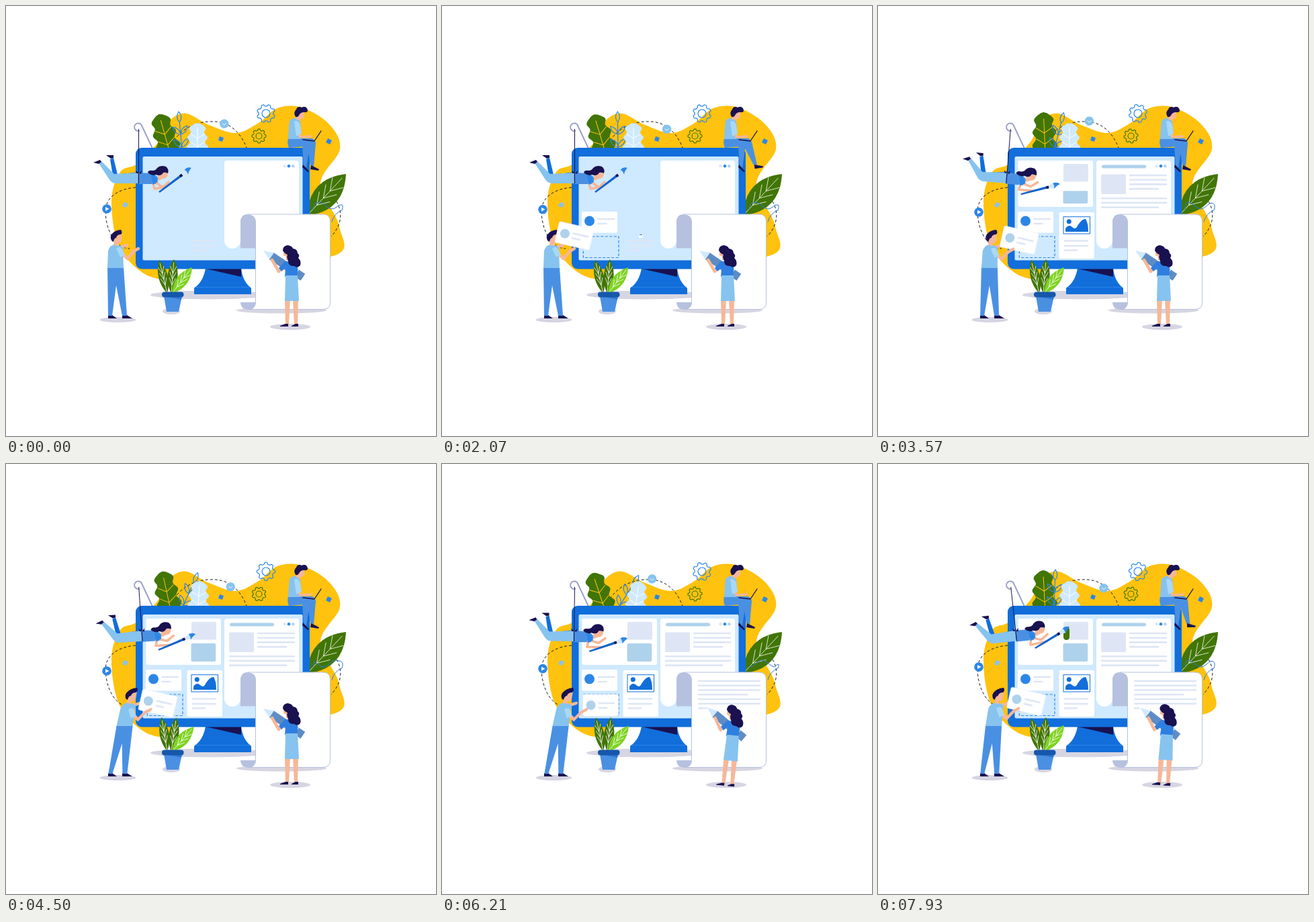
Animation of 640 by 640 pixels, one loop 8000 ms. Source, as an HTML page:

```html
<!DOCTYPE html>
<html lang="en">
<head>
<meta charset="utf-8">
<title>Building a page</title>
<style>
  html, body { margin: 0; width: 100%; height: 100%; overflow: hidden; background: #fff; }
  svg { display: block; width: 100%; height: 100%; }
  .line { fill: none; stroke-linecap: round; stroke-linejoin: round; }
  .dash { fill: none; stroke: #1d1d2b; stroke-dasharray: 4 3; }
  .white { fill: #fff; } .navy { fill: #191150; } .skin { fill: #f6b798; }
  .royal { fill: #116edb; } .blue { fill: #4a90e2; } .sky { fill: #86c3ef; }
  .ice { fill: #cfe9ff; } .soft { fill: #afd2ec; } .gray { fill: #dee6f5; }
  .bright { fill: #2c86e8; } .shade { fill: #d6d5e2; } .leaf { fill: #417505; }
  .lime { fill: #7ed321; } .sleeve { fill: #a9d8f7; } .roll { fill: #b5c1de; }
  .arm { stroke: #f6b798; stroke-width: 4.5; } .thin { stroke-width: 3.5; }
  .text { stroke: #dee6f5; stroke-width: 2.6; }
  .outline { stroke: #2c86e8; stroke-width: 1.2; }
</style>
</head>
<body>
<svg viewBox="0 0 640 640" xmlns="http://www.w3.org/2000/svg">
  <path id="blob" fill="#ffc20e"/>
  <ellipse class="shade" cx="303" cy="430" rx="88" ry="6.5"/>
  <path class="dash" d="M246 206C261 182 282 172 306 172C331 171 349 187 358 211"/>
  <path class="dash" d="M193 270C168 272 148 284 148 306C149 338 165 361 184 361"/>
  <path class="dash" d="M492 291C502 308 499 327 484 343"/>

  <g id="fan"></g>
  <g id="sprig"></g>
  <g id="pale"></g>
  <g id="bigLeaf"></g>
  <path id="squiggle" class="line" stroke="#2c7be0"/>

  <g class="line" stroke-width="1.2">
    <g transform="translate(387 160)" stroke="#2c86e8"><path id="bigGear"/><circle r="6"/></g>
    <g transform="translate(376.5 193.5)" stroke="#417505"><path id="smallGear"/><circle r="4.5"/></g>
  </g>
  <path class="bright" d="M318 194l6 2l-2 6l-6-2zM479 197l6 3l-3 6l-6-3z"/>
  <path class="sky" d="M176 292l6 2l-3 6l-6-2z"/>
  <g id="check"><circle r="6.7" class="sky"/><path class="line" stroke="#fff" d="M-2.5-.5L0 2L2.5-.5"/></g>
  <g id="play"><circle r="6.8" class="bright"/><path class="white" d="M-2-3L3.5 0L-2 3Z"/></g>
  <path class="line" stroke="#9a9fc8" stroke-width="1.9" d="M198 186A5.8 5.8 0 1 1 202.5 179L218 212"/>

  <!-- Monitor -->
  <path class="royal" d="M297 390H350Q352 410 365 420V429H280V420Q294 410 297 390Z"/>
  <path class="navy" d="M297 391H350V403Z"/>
  <path stroke="#3b8cec" stroke-width=".7" d="M281 418.5H364"/>
  <rect class="royal" x="193" y="211" width="259" height="180.5" rx="9"/>
  <rect class="ice" x="203.5" y="224" width="238" height="154.5" rx="2"/>
  <path class="white" d="M329 230H432Q436 230 436 234V310H360Q349 311 349 322V349A12 12 0 0 1 325 349V234Q325 230 329 230Z"/>
  <circle class="gray" cx="414.5" cy="238.3" r="2.3"/><circle class="bright" cx="421" cy="238.3" r="2.3"/><circle class="soft" cx="427.3" cy="238.3" r="2.3"/>

  <g id="hero">
    <rect class="white" x="208.5" y="230" width="111.5" height="69" rx="3"/>
    <rect id="heroTop" class="gray" x="276" y="235" width="37" height="26.5" rx="2"/>
    <rect id="heroLow" class="soft" x="275.5" y="267" width="36.7" height="27" rx="2"/>
  </g>
  <path id="heading" class="line" stroke="#afd2ec" stroke-width="5"/>
  <g id="article"></g>
  <rect id="thumb" class="gray" x="332" y="250.5" width="37" height="29.5" rx="2"/>
  <g id="profile">
    <rect class="white" x="208" y="306" width="53" height="31.5" rx="2"/>
    <circle class="bright" cx="219.5" cy="320" r="7.5"/>
    <path class="line text" d="M232.5 317H256M232.5 324H244.5"/>
  </g>
  <rect id="slot" class="outline" x="210.3" y="343" width="52.7" height="31.5" fill="none" stroke-dasharray="4 2.5"/>
  <g id="photo">
    <rect class="white" x="269.5" y="307" width="52.5" height="69" rx="2"/>
    <rect x="276" y="313.7" width="39.5" height="25.3" fill="none" stroke="#116edb"/>
    <circle class="royal" cx="284.3" cy="320.7" r="3.5"/>
    <path class="royal" d="M279 336V331Q284 324 289 329T297 327Q304 316 309 317Q313 323 313 336Z"/>
  </g>
  <path class="line text" d="M278 349.5H312M278 357H312M278 363.5H296"/>

  <!-- Paper -->
  <ellipse class="shade" cx="410" cy="453" rx="67" ry="4.5"/>
  <path fill="#fff" stroke="#b5c1de" d="M360 310H472Q482.5 310 482.5 321V441Q482.5 451.5 472 451.5H360Q371.5 451 371.5 441V322Z"/>
  <path class="roll" d="M349 360.5V322Q349 310 360 310Q372 311 372 322V360.5ZM349 441H371.5Q371 452 360 452Q349 451 349 441Z"/>
  <g id="notes" class="gray"></g>

  <!-- Potted plant -->
  <ellipse class="shade" cx="246" cy="454.5" rx="13" ry="4.5"/>
  <g id="plant"></g>
  <path class="blue" d="M235 432H262L257 455H239Z"/>
  <path fill="#2f78d4" d="M235 432H262L261 437Z"/>
  <rect x="232" y="425.5" width="32.5" height="8" rx="4" fill="#1657ab"/>

  <!-- Sitting man -->
  <path class="blue" d="M441 207H452L447 241L443 239Z"/>
  <path class="navy" d="M442 236L451 246L449 247L441 240Z"/>
  <g id="shin">
    <path class="blue" d="M447 200L461 204L458 239L453 237Z"/>
    <path class="navy" d="M454 237L466 243L465 245L453 243Z"/>
  </g>
  <path class="blue" d="M420 197H456Q463 201 460 208L421 211Q418 204 420 197Z"/>
  <path class="sky" d="M422 171Q429 164 437 168Q441 182 438 198H420Q421 180 422 171Z"/>
  <path class="skin" d="M433 157H444V164Q444 168 439 168L438 171L431 168Z"/>
  <path class="navy" d="M431 165Q427 158 432 154Q434 148 440 151Q447 148 449 155Q449 159 444 158Q438 158 436 163Q434 166 431 165Z"/>
  <path class="line arm thin" d="M434 183L438 195L454 194"/>
  <path class="sleeve" d="M429 172Q435 169 438 177L440 190L432 194Z"/>
  <path class="line" stroke="#191150" stroke-width="1.3" d="M442 199L459 201L469 186"/>

  <!-- Hanging woman -->
  <g id="swing">
    <path stroke="#191150" d="M197.5 183V249"/>
    <path class="royal" d="M155 228L160 226L166 251L198 247V256L160 259Z"/>
    <path class="sky" d="M200 248L197 264H164Q157 264 153 257L138 234L142 231L161 250Z"/>
    <path class="navy" d="M130 233L140 229L142 232L138 235ZM149 222H160V226L156 227Z"/>
    <path class="blue" d="M197 248L216 249Q224 251 227 257L223 265H197Z"/>
    <path class="navy" d="M196.800 245H198V264H196.800ZM198 249L193 245L194 249ZM198 249L202 245L201 250Z"/>
    <path class="skin" d="M226 250L239 247L241 250Q240 257 234 257L226 260Z"/>
    <path class="navy" d="M211 248Q212 244 218 245Q223 245 225 241Q230 236 238 239Q243 243 241 249Q237 247 234 248Q231 254 223 251Q218 254 211 248Z"/>
    <path id="reachFar" class="line arm thin"/>
    <path id="reachNear" class="line arm thin"/>
    <path class="bright" d="M216 251Q223 252 226 262L218 266Z"/>
  </g>
  <path id="paint" class="line" stroke="#417505" stroke-width="9"/>
  <g id="brush">
    <path d="M0-1.2L42-1.8V1.8L0 1.2Z" fill="#1263cd"/>
    <path class="navy" d="M39-1.9H43V1.9H39Z"/>
    <path class="ice" d="M43-2.2L51-4V4L43 2.2Z"/>
    <path class="bright" d="M50-4Q57-5 60 0Q54 1 50 5Q52 0 50-4Z"/>
  </g>

  <!-- Standing man with card -->
  <ellipse class="shade" cx="166.5" cy="467" rx="27" ry="4"/>
  <path class="navy" d="M152 460L158 460L165 465H152ZM173 460H180L188 465H173Z"/>
  <g id="man">
    <path class="line arm" d="M167 360L180 356"/>
    <path class="blue" d="M151 389H175L180 461H173L164 416L158 461H152Z"/>
    <path class="sky" d="M152 364Q155 354 165 355L174 359L175 390H151Z"/>
    <path class="skin" d="M161 342L172 338V349Q171 354 166 353L167 357L160 356Z"/>
    <path class="navy" d="M158 350Q154 345 157 340Q161 334 171 333Q174 337 171 340Q165 340 164 345Q161 345 160 351Z"/>
  </g>
  <g id="card">
    <rect x="-26.5" y="-16" width="53" height="32" rx="2.5" fill="#fff" stroke="#e9eef8" stroke-width=".5"/>
    <circle class="soft" cx="-14.5" r="7"/>
    <path class="line text" d="M-2-3H20M-2 4H9"/>
  </g>
  <g id="manArm">
    <path class="line arm" d="M171 367L181 376L190 365L197 361"/>
    <path class="sleeve" d="M164 361Q169 356 173 362L177 370L170 374Z"/>
  </g>

  <!-- Standing woman with pencil -->
  <ellipse class="shade" cx="423" cy="477.5" rx="30" ry="4.5"/>
  <g id="writer">
    <g transform="translate(383 364) rotate(34)">
      <path fill="#5e8cc5" d="M14-6H71V6H14Z"/>
      <path class="ice" d="M0 0L15-6V6ZM56-6H60V6H56Z"/>
    </g>
    <path class="skin" d="M415 437H423L421 474H416ZM427 437H435L434 474H429Z"/>
    <path class="navy" d="M408 476L416 473H420V477H408ZM425 476L431 473H435V477H425Z"/>
    <path class="line arm" d="M413 387L406 395L396 378"/>
    <path class="skin" d="M413 365L422 363L423 380L417 378V373L413 371Z"/>
    <path fill="#2f7fe0" d="M406 390L415 380H432Q436 390 433 403H415L416 390L410 395Z"/>
    <path class="sky" d="M416 401H434L436 439H415Z"/>
    <path class="navy" d="M412 364Q412 357 419 356Q426 357 427 361Q434 362 434 368Q438 371 435 375Q440 380 438 386Q434 391 429 387Q420 388 420 379Q417 374 419 370Q415 369 412 364Z"/>
  </g>
</svg>
<script>
const LOOP = 8000;
const TAU = Math.PI * 2;
const $ = id => document.getElementById(id);
const set = (id, name, value) => $(id).setAttribute(name, value);
const place = (id, value) => set(id, 'transform', value);
const clamp = (v, lo = 0, hi = 1) => Math.max(lo, Math.min(hi, v));
const mix = (a, b, k) => a + (b - a) * k;

// Motion rules: eased step, step up and back down, cosine wave
function ramp(t, from, to) {
  const k = clamp((t - from) / (to - from));
  return k * k * (3 - 2 * k);
}
const pulse = (t, rise, top, fall, end) => ramp(t, rise, top) - ramp(t, fall, end);
const wave = (t, peak, period) => Math.cos(TAU * (t - peak) / period);
const grow = (id, x, y, k) => place(id, `translate(${x} ${y}) scale(${k}) translate(${-x} ${-y})`);
const sway = (id, x, y, angle) => place(id, `translate(${x} ${y}) rotate(${angle})`);

function addPath(parent, className, d = '') {
  const el = $(parent).appendChild(document.createElementNS('http://www.w3.org/2000/svg', 'path'));
  el.setAttribute('class', className);
  el.setAttribute('d', d);
  return el;
}

const polygon = points => 'M' + points.map(p => p.map(v => v.toFixed(2)).join(' ')).join('L') + 'Z';

// Closed smooth curve through points
function smooth(points) {
  const at = i => points[(i + points.length) % points.length];
  const handle = (i, side) => [0, 1].map(c => at(i)[c] + side * (at(i + 1)[c] - at(i - 1)[c]) / 6);
  return `M${at(0)}` + points.map((_, i) => `C${handle(i, 1)} ${handle(i + 1, -1)} ${at(i + 1)}`).join('') + 'Z';
}

function gear(radius) {
  return polygon(Array.from({ length: 128 }, (_, i) => {
    const a = i / 128 * TAU;
    const r = radius * (0.89 + 0.1 * Math.tanh(2.5 * Math.cos(8 * a)));
    return [r * Math.cos(a), r * Math.sin(a)];
  }));
}

// Upright leaf with wavy lobes, growing from the origin
function lobedLeaf(parent, className, length, width, vein) {
  const side = sign => Array.from({ length: 61 }, (_, i) => {
    const s = i / 60;
    const lobes = 0.87 + 0.15 * wave(s, 0.88, 0.24);
    return [sign * width * (1 - 0.2 * s) * Math.sqrt(1 - s ** 10) * lobes, -s * length];
  });
  addPath(parent, className, polygon([...side(-1), ...side(1).reverse()]));
  let veins = `M0 0V${-0.88 * length}`;
  for (const s of [0.42, 0.62]) {
    veins += `M${-width * 0.6} ${-length * (s + 0.1)}L0 ${-length * s}L${width * 0.6} ${-length * (s + 0.1)}`;
  }
  addPath(parent, 'line', veins).setAttribute('stroke', vein);
}

function bladeOutline(x0, y0, x1, y1, width) {
  const length = Math.hypot(x1 - x0, y1 - y0);
  const nx = (y1 - y0) / length * width, ny = (x0 - x1) / length * width;
  const mx = (x0 + x1) / 2, my = (y0 + y1) / 2;
  return `M${x0} ${y0}Q${mx + nx} ${my + ny} ${x1} ${y1}Q${mx - nx} ${my - ny} ${x0} ${y0}Z`;
}

// Pointed leaf with a midrib and side veins
function blade(parent, className, x0, y0, x1, y1, width) {
  addPath(parent, className, bladeOutline(x0, y0, x1, y1, width));
  const point = (s, off) => {
    const k = off * width / Math.hypot(x1 - x0, y1 - y0);
    return `${mix(x0, x1, s) + (y1 - y0) * k} ${mix(y0, y1, s) + (x0 - x1) * k}`;
  };
  let d = `M${point(0, 0)}L${point(0.9, 0)}`;
  for (const s of [0.25, 0.42, 0.59]) d += `M${point(s + 0.2, 0.3)}L${point(s, 0)}L${point(s + 0.2, -0.3)}`;
  const veins = addPath(parent, 'line', d);
  veins.setAttribute('stroke', '#fff');
  veins.setAttribute('stroke-width', 0.8);
}

set('blob', 'd', smooth([
  [285, 380], [245, 405], [205, 398], [168, 357], [157, 290], [170, 247], [195, 235], [227, 202],
  [243, 171], [268, 160], [302, 177], [342, 189], [376, 174], [404, 152], [440, 151], [481, 176],
  [497, 213], [468, 265], [496, 328], [483, 373],
]));
lobedLeaf('fan', 'leaf', 82, 20, '#ffc20e');
lobedLeaf('pale', 'ice', 60, 17, '#fff');
blade('bigLeaf', 'leaf', 448, 312, 506, 250, 36);
blade('plant', 'leaf', 240, 428, 228, 378, 14);
blade('plant', 'leaf', 246, 428, 250, 377, 15);
blade('plant', 'lime', 247, 428, 277, 389, 17);
addPath('sprig', 'line outline', 'M0 4V-42' + bladeOutline(0, -42, 0, -58, 6));
for (const y of [-5, -24]) {
  for (const side of [-1, 1]) addPath('sprig', 'line outline', bladeOutline(0, y, side * 11, y - 12, 6));
}
set('bigGear', 'd', gear(13.7));
set('smallGear', 'd', gear(10.6));

// Text blocks: full lines, with a shorter last one
const paragraph = (x, top, count) => Array.from({ length: count }, (_, i) =>
  ({ el: addPath('article', 'line text'), x, y: top + 6.7 * i, end: i < count - 1 ? 429 : 417 }));
const articleLines = [...paragraph(375, 252, 4), ...paragraph(333, 286.2, 3)];
const noteLines = Array.from({ length: 6 }, (_, i) =>
  ({ el: addPath('notes', ''), y: 323 + 6.75 * i, end: i === 3 ? 455 : 474 }));
const lastNote = addPath('notes', '');
const drawLine = (el, x, end, y, k) => el.setAttribute('d', k ? `M${x} ${y}H${mix(x, end, k)}` : '');
const wedge = (el, x, end, y, tail) =>
  el.setAttribute('d', end > x ? `M${x} ${y - 1.3}L${end} ${y - tail}V${y + tail}L${x} ${y + 1.3}Z` : '');

function drawScenery(t) {
  const settle = 1 - ramp(t, 500, 1500);
  sway('fan', 250, 240, -12.5 + 10 * wave(t, 3450, 4250) - 7 * settle);
  sway('sprig', 262, 215, -5 + 37 * pulse(t, 1000, 6000, 6200, 8600));
  sway('pale', 285, 234, 8 * pulse(t, 4000, 5200, 6200, 7500));
  place('plant', `rotate(${6 * pulse(t, 3600, 5100, 5200, 6700)} 246 428)`);

  const x = 324.5 + 12 * wave(t, 1800, 3000) + 10 * settle;
  place('check', `translate(${x} ${171 + (x - 311) ** 2 * 0.022})`);
  place('play', `translate(150 ${305 - 3 * wave(Math.max(t, 1300), 1300, 6400)})`);

  const moving = Math.max(0, t - 3000);
  place('bigGear', `rotate(${22 + moving * 0.015})`);
  place('smallGear', `rotate(${-moving * 0.015})`);

  let d = 'M457 302';
  for (let px = 459; px <= 495; px += 2) d += `L${px} ${297 - 5 * Math.sin((px - 457) / 6 + moving / 700)}`;
  set('squiggle', 'd', d + 'Q504 293 500 304Q488 309 485 321');

  const kick = 18 * pulse(t, 500, 1700, 2600, 3200) + 10 * ramp(t, 6500, 7930);
  place('shin', `rotate(${-kick} 457 203)`);
}

function drawScreen(t) {
  grow('profile', 234.5, 322, ramp(t, 1300, 1900));
  set('slot', 'opacity', ramp(t, 1400, 1950));
  grow('photo', 295.7, 341.5, ramp(t, 1930, 2650));
  grow('hero', 264, 264.5, ramp(t, 2200, 2800));
  grow('heroTop', 294.5, 248, ramp(t, 2600, 3200));
  const low = ramp(t, 3000, 3900);
  place('heroLow', `translate(0 ${294 * (1 - low)}) scale(1 ${low})`);
  grow('thumb', 350.5, 265, ramp(t, 2400, 3000));
  drawLine($('heading'), 335.5, 396.5, 239, ramp(t, 2250, 2650));
  articleLines.forEach(({ el, x, end, y }, i) => drawLine(el, x, end, y, ramp(t, 2320 + i * 70, 2720 + i * 70)));
}

function drawHangingWoman(t) {
  const angle = 6.3 * Math.sin(TAU * (clamp(t, 3320, 6710) - 3320) / 1950);
  const swing = `rotate(${angle} 197 181)`;
  place('swing', swing);

  const lower = ramp(t, 3070, 3570), dab = ramp(t, 6400, 7250);
  const x = 228 - 7.5 * lower + 3 * dab, y = 277 + 1.5 * lower - dab;
  const tilt = -37 + 18 * lower - 6 * dab;
  const grip = mix(13, 19, lower), a = tilt * TAU / 360;
  place('brush', `${swing} translate(${x} ${y}) rotate(${tilt})`);
  set('reachFar', 'd', `M224 263L${233 + lower} ${270 - 4 * lower}L${242 + 2 * lower} ${262 - 3 * lower}`);
  set('reachNear', 'd', `M219 263L${221 - 4 * lower} 272L${x + grip * Math.cos(a)} ${y + grip * Math.sin(a)}`);
  drawLine($('paint'), 0, 0, 0, 0);
  const painted = ramp(t, 7250, 7850);
  if (painted) set('paint', 'd', `M280.5 247v${10.5 * painted}`);
}

function drawMan(t) {
  const reach = pulse(t, 3200, 4450, 7000, 9400);
  const lean = 0.185 * reach;
  const skew = `matrix(1 0 ${-lean} 1 ${463 * lean} 0)`;
  place('man', skew);
  place('manArm', `${skew} translate(0 ${lean * 24})`);

  const fall = clamp((t - 500) / 1530);
  const carry = Math.sqrt(reach), placed = pulse(t, 4500, 4850, 6250, 6800);
  const x = 197 + 29 * carry + 10 * placed;
  const y = 20 + 322 * mix(fall, fall * fall, 0.25) + 14 * carry + 3 * placed;
  place('card', `translate(${x} ${y}) rotate(${13 * (1 - placed)})`);
  set('card', 'opacity', ramp(t, 500, 650));
}

function drawWriter(t) {
  const angle = 6 * ramp(t, 4900, 6200) - 2.3 * ramp(t, 6500, 7930);
  place('writer', `translate(0 ${angle / 3}) rotate(${angle} 422 477)`);
  const full = ramp(t, 5200, 5700);
  noteLines.forEach(({ el, end, y }, i) => {
    const k = ramp(t, 4700 + i * 15, 5200 + i * 15);
    wedge(el, 381, mix(381, end - 3, k) + 3 * full, y, 0.15 + 1.15 * full);
  });
  wedge(lastNote, 381, 381 + angle * 2.3, 363.5, 1.3);
}

function draw() {
  const t = performance.now() % LOOP;
  drawScenery(t);
  drawScreen(t);
  drawHangingWoman(t);
  drawMan(t);
  drawWriter(t);
  requestAnimationFrame(draw);
}
draw();
</script>
</body>
</html>
```
